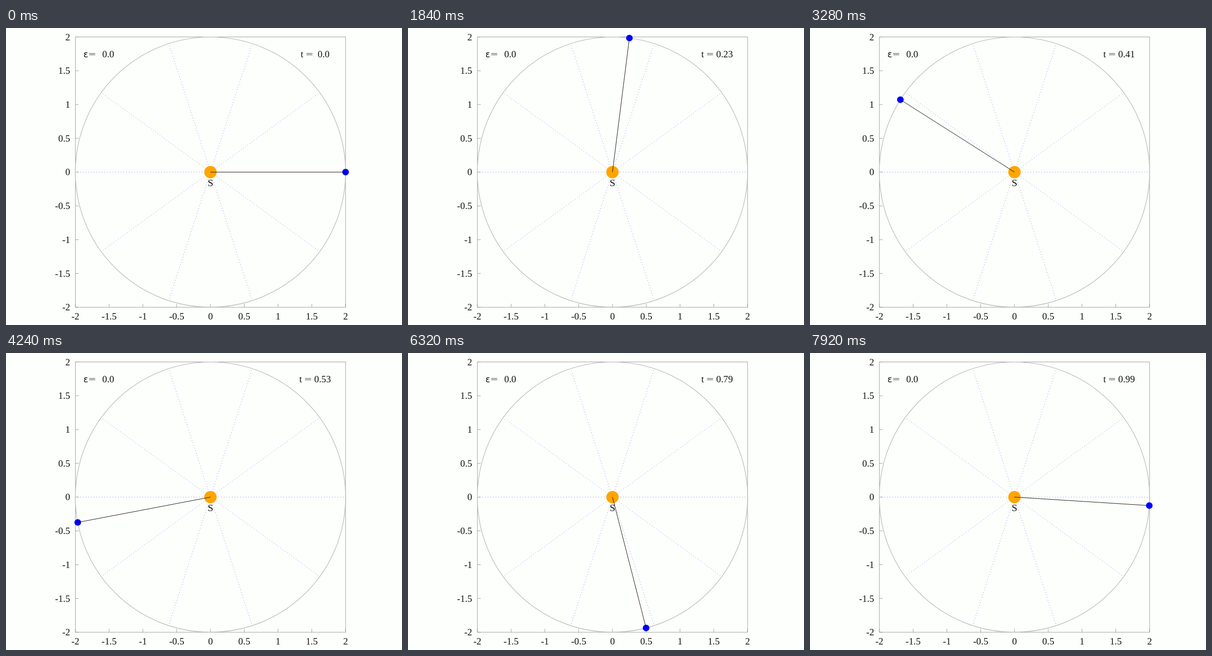
An HTML page with a canvas that plays this animation: 864x648 px, repeating every 8 s.

```html
<!DOCTYPE html>
<html lang="en">
<head>
<meta charset="utf-8">
<title>Circular orbit</title>
<style>
html, body { margin: 0; overflow: hidden; background: #fdfffc; }
canvas { display: block; }
</style>
</head>
<body>
<canvas id="stage" width="864" height="648"></canvas>
<script>
const ctx = document.getElementById('stage').getContext('2d');
const CX = 446.1, CY = 314.4, R = 294.8;
const STEP = 80, STEPS = 100;
const SERIF = '20.8px "Liberation Serif", serif';
const SANS = '19px "DejaVu Sans", sans-serif';
const EQUALS = '200 21px "DejaVu Sans", sans-serif';

function line(x1, y1, x2, y2, color, width, dash = []) {
  ctx.strokeStyle = color;
  ctx.lineWidth = width;
  ctx.setLineDash(dash);
  ctx.beginPath();
  ctx.moveTo(x1, y1);
  ctx.lineTo(x2, y2);
  ctx.stroke();
  ctx.setLineDash([]);
}

function disc(x, y, r, color) {
  ctx.fillStyle = color;
  ctx.beginPath();
  ctx.arc(x, y, r, 0, 2 * Math.PI);
  ctx.fill();
}

function text(str, x, y, align = 'left', font = SERIF) {
  ctx.fillStyle = '#111';
  ctx.font = font;
  ctx.textAlign = align;
  ctx.fillText(str, x, y);
}

// Position on the orbit after a fraction of one turn
function orbit(turn) {
  const a = 2 * Math.PI * turn;
  return [CX + R * Math.cos(a), CY - R * Math.sin(a)];
}

function axes() {
  const left = CX - R, bottom = CY + R;
  ctx.strokeStyle = '#808080';
  ctx.lineWidth = 0.8;
  ctx.strokeRect(left, CY - R, 2 * R, 2 * R);
  for (let v = -2; v <= 2; v += 0.5) {
    const x = CX + v * R / 2, y = CY - v * R / 2;
    line(left, y, left + 7.4, y, '#808080', 0.8);
    line(x, bottom, x, bottom - 7.4, '#808080', 0.8);
    text(v, 140, y + 7, 'right');
    text(v, x, 636, 'center');
  }
}

function equation(name, value, x, valueX, font) {
  text(name, x, 64, 'left', font);
  text('=', x + 10.2, 64, 'left', EQUALS);
  text(value, valueX, 64);
}

function draw(t) {
  ctx.fillStyle = '#fdfffc';
  ctx.fillRect(0, 0, 864, 648);
  axes();

  ctx.strokeStyle = '#bdbdbd';
  ctx.lineWidth = 1.4;
  ctx.beginPath();
  ctx.arc(CX, CY, R, 0, 2 * Math.PI);
  ctx.stroke();
  for (let k = 0; k < 10; k++) line(CX, CY, ...orbit(k / 10), '#00f', 0.8, [0.9, 5]);

  disc(CX, CY, 13.5, '#ffa500');
  text('S', CX, 344.5, 'center', '22px "Liberation Serif", serif');
  equation('ε', '0.0', 169, 210, SANS);
  const oneDecimal = Math.round(t * 100) % 10 === 0;
  if (oneDecimal) equation('t', t.toFixed(1), 643, 680);
  else equation('t', t.toFixed(2), 640, 672.5);

  const [x, y] = orbit(t);
  disc(x, y, 7.2, '#00f');
  line(CX, CY, x, y, '#120808', 1);
}

function tick() {
  draw(Math.floor(performance.now() / STEP) % STEPS / STEPS);
  requestAnimationFrame(tick);
}
tick();
</script>
</body>
</html>
```
